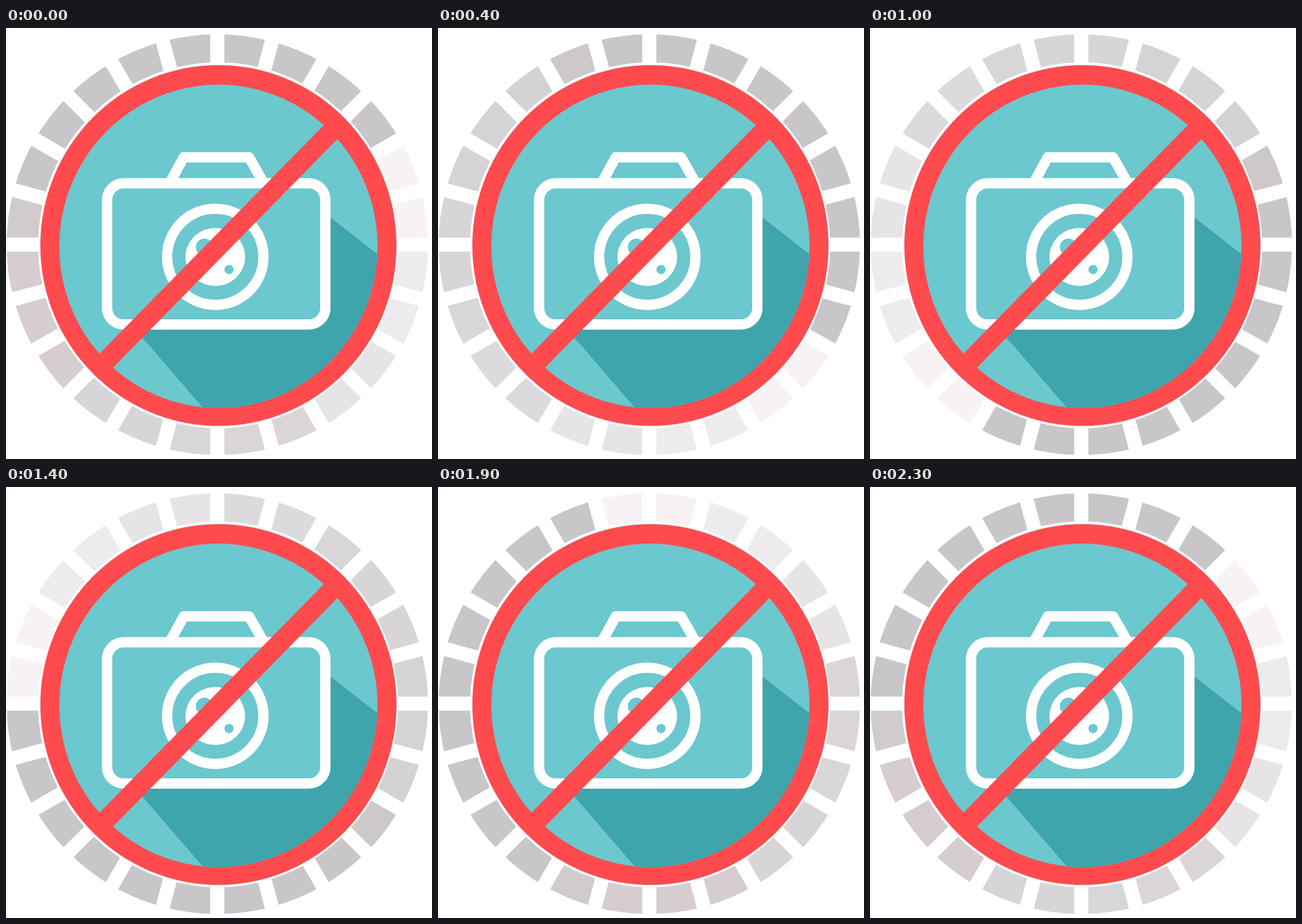
An HTML page for the animation above (2.4 s loop, 743 by 753 pixels).

```html
<!DOCTYPE html>
<html lang="en">
<head>
<meta charset="utf-8">
<title>No photography</title>
<style>
  html, body { margin: 0; width: 100%; height: 100%; overflow: hidden; background: #fff; }
  svg { display: block; width: 743px; height: 753px; }
</style>
</head>
<body>
<svg viewBox="0 0 743 753">
  <defs>
    <clipPath id="face"><ellipse cx="370.5" cy="381.5" rx="277.5" ry="282.5"/></clipPath>
  </defs>
  <g id="wheel"></g>
  <g id="gaps" stroke="#fff" stroke-width="24.6"></g>

  <ellipse cx="370" cy="379.6" rx="314" ry="319.6" fill="#fff"/>
  <ellipse cx="370.5" cy="380" rx="311" ry="316" fill="#d9d6d8"/>
  <ellipse cx="370.5" cy="380" rx="310.5" ry="315" fill="#ff4b4e"/>

  <g clip-path="url(#face)">
    <rect x="90" y="95" width="562" height="574" fill="#6bc8ce"/>
    <path d="M566 331L700 436V720H391L343 663L226 527L540 518L557 500Z" fill="#3fa5ac"/>
  </g>

  <rect x="176.3" y="271.3" width="380.7" height="246.7" rx="29" fill="#6bc8ce" stroke="#fff" stroke-width="18"/>
  <path d="M286 270L310 226H424L449 270" fill="none" stroke="#fff" stroke-width="18" stroke-linejoin="round"/>
  <circle cx="365" cy="399.7" r="84" fill="none" stroke="#fff" stroke-width="18"/>
  <ellipse cx="365" cy="400" rx="52" ry="50.5" fill="#fff"/>
  <circle cx="346" cy="383" r="15" fill="#6bc8ce"/>
  <circle cx="389" cy="422" r="8" fill="#6bc8ce"/>

  <path d="M582 165.7L158.5 597.8" stroke="#ff4b4e" stroke-width="34"/>
</svg>
<script>
  const COUNT = 24, STEP = 100, START = 4;
  const CX = 368.5, CY = 378.5, R = 367.5;
  const DARK = '#c9c6ca';
  // Tail colours, from the bright head backwards
  const COOL = ['#f8f2f4', '#f8f2f4', '#edebed', '#edebed', '#e6e4e7', '#e6e4e6',
    '#dddade', '#dddade', '#d8d6d9', '#d7d5d8', '#d7d5d8', '#d4d3d5', '#d4d3d5', '#d3d2d4', '#cdc9cb'];
  const WARM = [...COOL.slice(0, 6), '#dcd5d8', '#dcd5d8', '#d7d6d8', '#d7d5d8', '#d7d5d8',
    '#d6cdd0', '#d6cdd0', '#d6cdd0', '#d1cbce'];

  function add(parent, tag, attrs) {
    const el = document.createElementNS('http://www.w3.org/2000/svg', tag);
    for (const key in attrs) el.setAttribute(key, attrs[key]);
    return parent.appendChild(el);
  }

  function rim(i, r) {
    const a = i * 2 * Math.PI / COUNT;
    return [CX + r * Math.sin(a), CY - r * Math.cos(a)];
  }

  const wheel = document.getElementById('wheel');
  const gaps = document.getElementById('gaps');
  const blocks = [];
  for (let i = 0; i < COUNT; i++) {
    blocks.push(add(wheel, 'path', {
      d: `M${CX} ${CY}L${rim(i, R)}A${R} ${R} 0 0 1 ${rim(i + 1, R)}Z`
    }));
    const [x1, y1] = rim(i, 290), [x2, y2] = rim(i, 375);
    add(gaps, 'line', { x1, y1, x2, y2 });
  }

  function paint(step) {
    const tail = step < 4 || step > 18 ? WARM : COOL;
    blocks.forEach((block, i) => {
      const age = (i - START - step + 2 * COUNT) % COUNT;
      block.setAttribute('fill', tail[age] || DARK);
    });
  }

  const begin = performance.now();
  function tick() {
    paint(Math.floor((performance.now() - begin) / STEP) % COUNT);
    requestAnimationFrame(tick);
  }
  tick();
</script>
</body>
</html>
```
